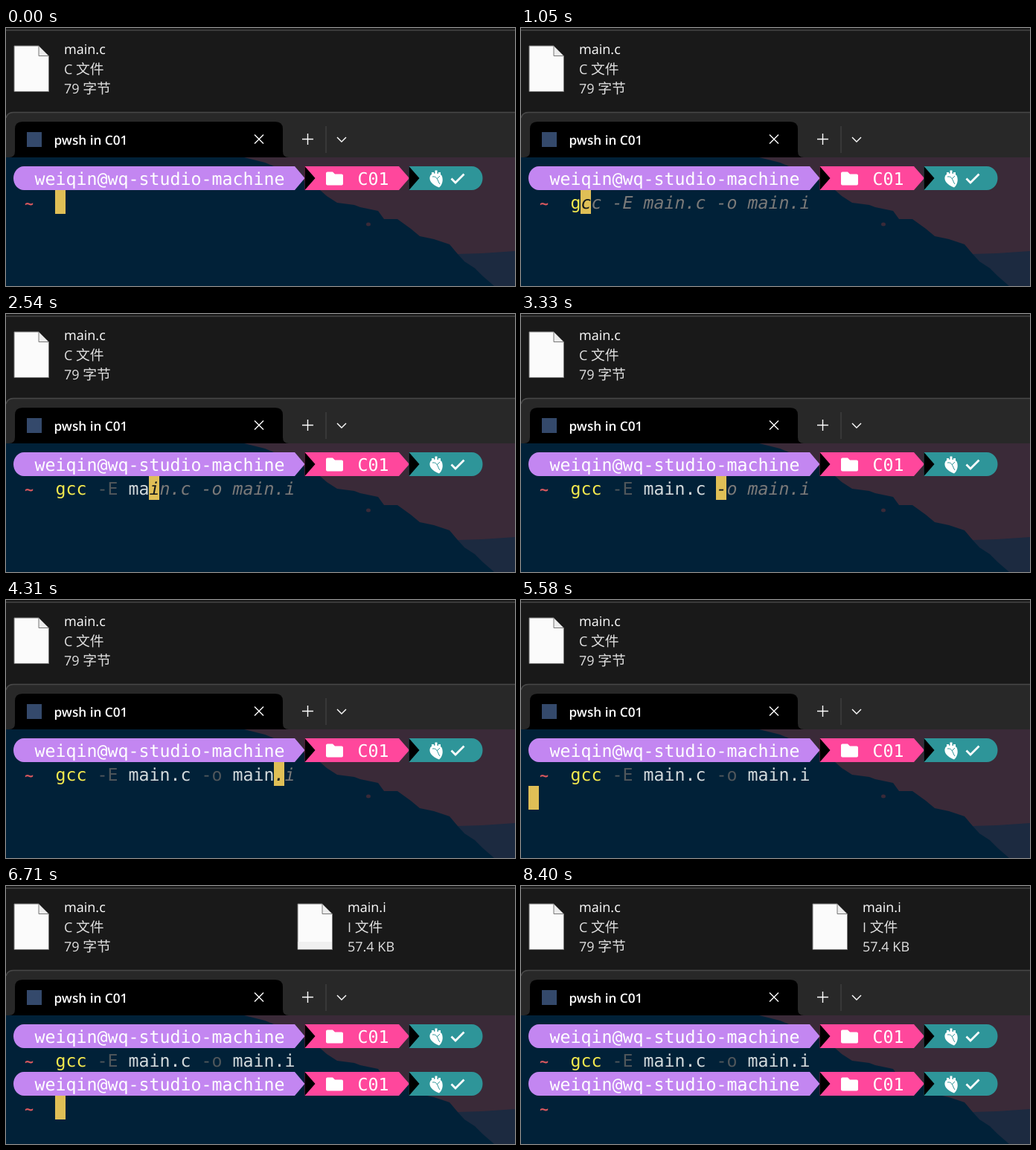
Animation of 684 by 347 pixels, one loop 8.5 s. Source, as an HTML page:

```html
<!DOCTYPE html>
<html lang="zh">
<head>
<meta charset="utf-8">
<title>gcc -E</title>
<style>
  html, body { margin: 0; width: 100%; height: 100%; overflow: hidden; background: #191919; }
  svg { display: block; width: 684px; height: 347px; }
  text { white-space: pre; text-rendering: geometricPrecision; }
  .ui { font: 18px "Open Sans", "Noto Sans", sans-serif; fill: #e0e0e0; }
  .ui .cjk { font: 18.8px "Noto Sans CJK SC", "Noto Sans CJK", sans-serif; }
  .ui .name { fill: #fff; }
  .title { font: 600 17.2px "Open Sans", "Noto Sans", sans-serif; fill: #fff; }
  .mono { font: 23.25px "DejaVu Sans Mono", "Noto Sans Mono", monospace; fill: #fff; }
  .tilde { font-size: 20px; font-weight: bold; fill: #d9585e; }
  .line { fill: none; stroke: #fff; stroke-width: 1.4; }
  .cmd { fill: #f5ea4e; }
  .plain { fill: #d3dadc; }
  .flag { fill: #50575b; }
  .hint { fill: #7b7a79; font-style: italic; }
  .under { fill: #14191c; }
</style>
</head>
<body>
<svg id="stage" viewBox="0 0 684 347"></svg>
<script>
const LOOP = 8500, CELL = 14, ROW = 32, LEFT = 10, TOP = 186;
const HOST = "weiqin@wq-studio-machine";
const CMD = "gcc -E main.c -o main.i";
const CMD_COL = 4;

// Time at which each character of the command is typed
const KEYS = [1050, 1280, 1410, 1570, 1750, 2080, 2270, 2390, 2540, 2610, 2680, 2960,
  3150, 3330, 3530, 3710, 3890, 4050, 4140, 4220, 4310, 4880, 5110];
const BLINKS = [130, 660, 6200, 6710, 7280, 7830, 8350];
const ENTER = 5580, DONE = 5630, FILE = 6710, SETTLED = 8400;

const colX = col => LEFT + col * CELL;
const rowY = row => TOP + row * ROW;
const passed = (times, t) => times.filter(v => v <= t).length;

function mono(str, col, row, cls = "") {
  const xs = [...str].map((_, i) => colX(col + i) + 0.4).join(" ");
  return `<text class="mono ${cls}" x="${xs}" y="${rowY(row) + 25}">${str}</text>`;
}

function file(x, name, kind, size, id = "") {
  const [a, ka] = kind, [b, sb] = size;
  return `<g ${id}>
    <path d="M${x + 1} 24h33l13.500 13.500v48h-46.500z" fill="#fbfbfb" stroke="#777"/>
    <path d="M${x + 34} 24v13.500h13.500z" fill="#ececec" stroke="#777"/>
    <g class="ui">
      <text class="name" x="${x + 68}" y="35">${name}</text>
      <text x="${x + 68}" y="61.5">${a}<tspan class="cjk">${ka}</tspan></text>
      <text x="${x + 68}" y="88">${b}<tspan class="cjk">${sb}</tspan></text>
    </g></g>`;
}

const arrow = x => `<path d="M${x} 0l14 16l-14 16z"/>`;

function prompt(row, id) {
  return `<g id="${id}">
    <g transform="translate(0 ${rowY(row)})">
      <path d="M24 0H388L401.500 16L388 32H24A14 16 0 0 1 24 0z" fill="#c386f1"/>
      <path d="M401.500 0H528L542 16L528 32H401.500z" fill="#ff479c"/>
      <path d="M541.500 0H626A14.500 16 0 0 1 626 32H541.500z" fill="#2e9599"/>
      ${arrow(401.5)}${arrow(541.5)}
      <path d="M432 7.500h7l3 3h9q2 0 2 2v11q0 2-2 2h-19q-2 0-2-2v-14q0-2 2-2z" fill="#fff"/>
      <path d="M570.500 12C567 18 572 25 582 28.500C586.500 25 588 18 585.500 12.500C582 9 574 8 570.500 12z" fill="#fff"/>
      <path d="M573.500 12V8M578 11V5.500M582.500 12V8" stroke="#fff" stroke-width="3" fill="none"/>
      <path d="M573 14q5-1 7 4t3 6M579 17l4-4" stroke="#2e9599" fill="none"/>
      <path d="M598.500 16.500l5.500 5.500l11.500-11.500" stroke="#fff" stroke-width="2.800" fill="none"/>
    </g>
    ${mono(HOST, 2, row)}${mono("C01", 33, row)}${mono("~", 1.05, row + 1, "tilde")}
  </g>`;
}

const stage = document.getElementById("stage");
stage.innerHTML = `
  <rect width="684" height="347" fill="#191919"/>
  <rect y="2" width="684" height="2" fill="#3a3a3a"/>
  ${file(10, "main.c", ["C ", "文件"], ["79 ", "字节"])}
  ${file(391, "main.i", ["I ", "文件"], ["57.4 KB", ""], 'id="out"')}
  <rect id="shade" x="392.500" y="75" width="45.500" height="10" fill="#f0f0f0"/>

  <path d="M0 347V121Q2 113.500 10 113.500H684V347z" fill="#282828"/>
  <path d="M0 121Q2 113.500 10 113.500H684" fill="none" stroke="#474747" stroke-width="1.500"/>
  <path d="M4 174q8 0 8-8V136q0-10 10-10H362q10 0 10 10V166q0 8 8 8z" fill="#000"/>
  <rect x="28" y="140" width="20" height="20" fill="#34496b"/>
  <text class="title" x="64.500" y="157">pwsh in C01</text>
  <path class="line" d="M334 143.500l12 12m0-12l-12 12M398 149.500h15m-7.500-7.500v15M445 147l6 6l6-6"/>
  <rect x="429.500" y="132" width="1" height="36" fill="#484848"/>

  <rect y="174" width="684" height="173" fill="#012138"/>
  <path d="M320 174L348 181L360 186L395 202L422 218L431 226L445 235L468 238L476 241L500 246
    L508 257L526 257L544 270L556 280L575 284L596 291L607 304L684 304V174z" fill="#3a2a38"/>
  <ellipse cx="487" cy="264" rx="3" ry="2.500" fill="#3a2a38"/>
  <path d="M607 304L640 303L684 300V347H656L641 334L630 323L616 314z" fill="#1c2a40"/>

  ${prompt(0, "first")}${prompt(2, "second")}
  <rect id="cursor" width="${CELL}" height="${ROW}" fill="#e0bf56"/>
  <g id="cmd">${[...CMD].map((c, i) => mono(c, CMD_COL + i, 1)).join("")}</g>`;

const byId = id => document.getElementById(id);
const show = (id, on) => byId(id).setAttribute("visibility", on ? "visible" : "hidden");
const glyphs = [...byId("cmd").children];

function style(i, typed) {
  if (i >= typed) return "hint";
  if (i < 3) return "cmd";
  // A switch is recoloured only once its letter is in place
  const dash = [4, 14].find(d => i === d || i === d + 1);
  return dash !== undefined && typed > dash + 1 ? "flag" : "plain";
}

function cursorCell(t, typed) {
  if (t >= DONE) return [CMD_COL, 3];
  if (t >= ENTER) return [0, 2];
  return [CMD_COL + typed, 1];
}

function draw(t) {
  const typed = passed(KEYS, t);
  const [col, row] = cursorCell(t, typed);
  const lit = passed(BLINKS, t) % 2 === 0;

  glyphs.forEach((g, i) => {
    const under = lit && row === 1 && i === typed ? "under" : "";
    g.setAttribute("class", `mono ${style(i, typed)} ${under}`);
  });
  show("cmd", typed > 0);
  show("cursor", lit);
  byId("cursor").setAttribute("x", colX(col));
  byId("cursor").setAttribute("y", rowY(row));
  show("second", t >= DONE);
  show("out", t >= FILE);
  show("shade", t >= FILE && t < SETTLED);
}

const start = performance.now();
function tick(now) {
  draw(Math.max(0, now - start) % LOOP);
  requestAnimationFrame(tick);
}
draw(0);
requestAnimationFrame(tick);
</script>
</body>
</html>
```
